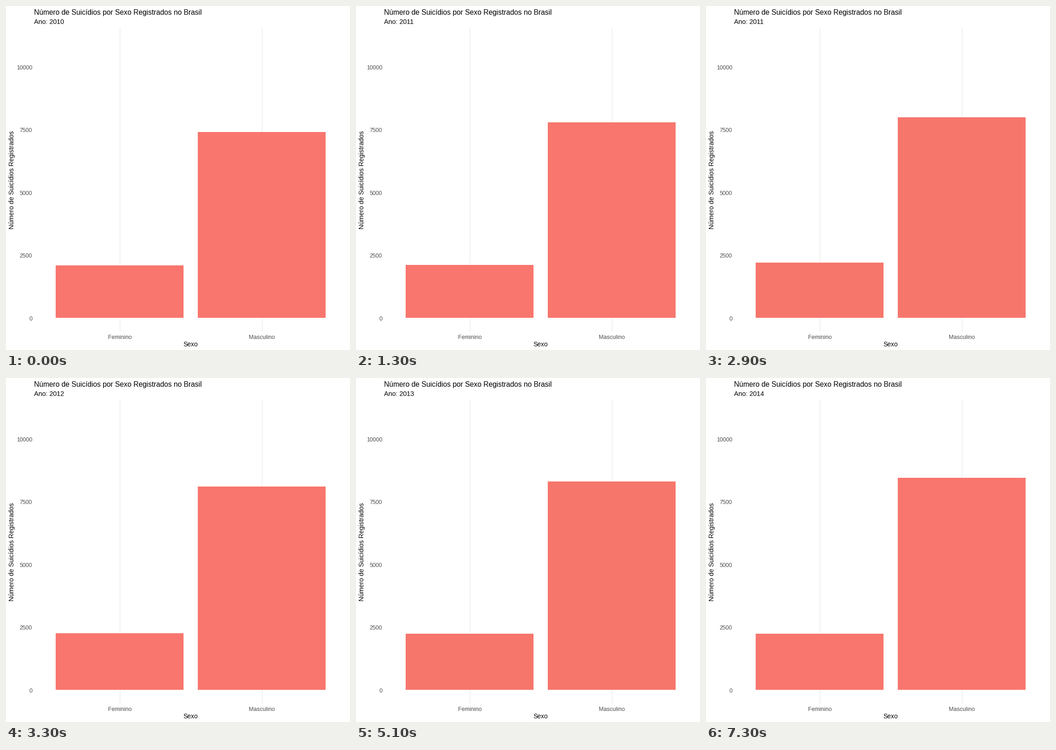
These frames come from a looping animation (748 px wide and 748 px high, 8000 ms). A matplotlib script:

```python
import matplotlib.pyplot as plt
from matplotlib.animation import FuncAnimation
from matplotlib.patches import Rectangle

SIZE, DPI = 748, 64
FRAMES, INTERVAL = 80, 100
FIRST_YEAR = 2010
BASE = 678                      # pixel row of the value 0
BAR_WIDTH = 278
LEFTS = (108, 417)
CENTRES = (247, 556)
# Bar tops in pixel rows, one value per year
TOPS = (
    (563.9, 563.1, 554.6, 556.6, 556.3),
    (273.8, 252.8, 235.6, 222.0, 217.0),
)
START, YEAR_FRAMES, STEPS = 5, 20, 5
STILL, MOVING = "#F8766D", "#F6766C"

plt.rcParams["font.family"] = ["Liberation Sans", "DejaVu Sans"]

fig = plt.figure(figsize=(SIZE / DPI, SIZE / DPI), dpi=DPI, facecolor="white")
ax = fig.add_axes([0, 0, 1, 1])
ax.set_xlim(0, SIZE)
ax.set_ylim(SIZE, 0)
ax.axis("off")


def box(x, y, w, h, color, z):
    patch = Rectangle((x, y), w, h, facecolor=color, linewidth=0,
                      antialiased=False, zorder=z)
    return ax.add_patch(patch)


def label(x, y, text, px, color="black", ha="left", rotation=0):
    return ax.text(x, y, text, fontsize=px * 72 / DPI, color=color, ha=ha,
                   va="baseline", rotation=rotation, rotation_mode="anchor")


def pose(frame):
    """Year index and step (0 to STEPS) on the way to the next year."""
    if frame < START:
        return 0, 0
    year, rest = divmod(frame - START, YEAR_FRAMES)
    return year, min(rest // 2 + 1, STEPS)


label(61.5, 19, "Número de Suicídios por Sexo Registrados no Brasil", 15.65)
subtitle = label(61.5, 39, "", 14.25)
label(17, 378, "Número de Suicídios Registrados", 14.25, ha="center", rotation=90)
label(401.5, 740, "Sexo", 13.9, ha="center")

for value in range(0, 10001, 2500):
    label(57, round(684 - value * 0.05464), str(value), 12.3, "#4D4D4D", "right")

for x, name in zip(CENTRES, ("Feminino", "Masculino")):
    box(x, 47, 2, 661, "#F1F1F1", 1)
    label(x + 0.3, 724, name, 12.55, "#4D4D4D", "center")

bars = [box(x, BASE, BAR_WIDTH, 0, STILL, 2) for x in LEFTS]


def draw(frame):
    year, step = pose(frame)
    moving = 0 < step < STEPS
    for bar, tops in zip(bars, TOPS):
        top = round(tops[year] + (tops[year + 1] - tops[year]) * step / STEPS)
        bar.set_y(top)
        bar.set_height(BASE - top)
        bar.set_facecolor(MOVING if moving else STILL)
    shown = FIRST_YEAR + year + (step >= 4)
    subtitle.set_text(f"Ano: {shown}")
    return [*bars, subtitle]


anim = FuncAnimation(fig, draw, frames=FRAMES, interval=INTERVAL,
                     init_func=lambda: draw(0), repeat=True, repeat_delay=0)
plt.show()
```
